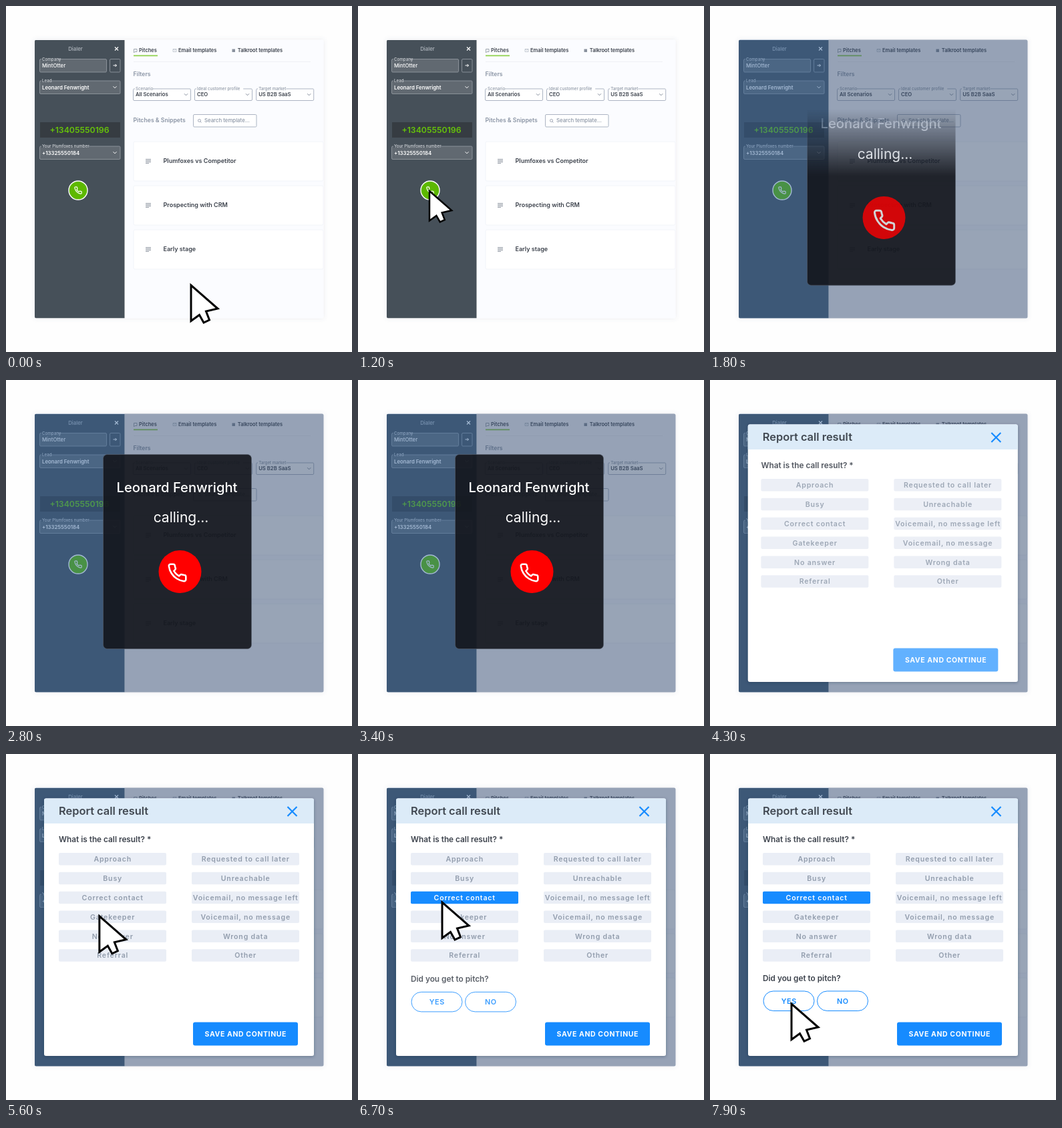
An HTML page for the animation above (8 s loop, 518x518 px).

```html
<!DOCTYPE html>
<html lang="en">
<head>
<meta charset="utf-8">
<title>Dialer</title>
<style>
  html, body { margin: 0; width: 100%; height: 100%; overflow: hidden; background: #fefefe; }
  svg { display: block; width: 100vw; height: 100vh; }
  text { font-family: Inter, "Liberation Sans", sans-serif; font-weight: 600; }
</style>
</head>
<body>
<svg id="stage" viewBox="0 0 518 518" xmlns="http://www.w3.org/2000/svg"></svg>
<script>
const LOOP = 8000;
const INK = '#3c424c', GREY = '#8b95a5', BLUE = '#168bff';

const rect = (x, y, w, h, fill, more = '') =>
  `<rect x="${x}" y="${y}" width="${w}" height="${h}" fill="${fill}" ${more}/>`;
const text = (x, y, size, fill, str, more = '') =>
  `<text x="${x}" y="${y}" font-size="${size}" fill="${fill}" ${more}>${str}</text>`;
const line = (d, stroke, width = 1, more = '') =>
  `<path d="${d}" fill="none" stroke="${stroke}" stroke-width="${width}" ${more}/>`;
const chevron = (x, y, stroke) => line(`M${x - 2.5} ${y - 1.2}l2.5 2.5l2.5 -2.5`, stroke, 1);
const centred = 'text-anchor="middle"';

// 24-unit handset, centred on x, y
const phone = (x, y, scale, width) => line(
  'M22 16.9v3a2 2 0 0 1-2.2 2a19.8 19.8 0 0 1-8.6-3.1a19.5 19.5 0 0 1-6-6a19.8 19.8 0 0 1-3.1-8.7' +
  'a2 2 0 0 1 2-2.1h3a2 2 0 0 1 2 1.7a13 13 0 0 0 .7 2.8a2 2 0 0 1-.5 2.1l-1.3 1.3a16 16 0 0 0 6 6' +
  'l1.3-1.3a2 2 0 0 1 2.1-.5a13 13 0 0 0 2.8.7a2 2 0 0 1 1.8 2.1z',
  '#fff', width, `stroke-linejoin="round" transform="translate(${x} ${y}) scale(${scale}) translate(-12 -12)"`);

const darkField = (y, w, label, value, weight) =>
  rect(50.5, y, w, 19.5, '#616971', 'rx="1.5" stroke="#989fa6" stroke-width=".8"') +
  rect(53, y - 1, label.length * 3.25 + 2, 3, '#4d565f') +
  text(54, y + 2.2, 6.2, '#d5d8dc', label, 'style="font-weight:500"') +
  text(54, y + 12.5, 7.8, '#fff', value, `style="font-weight:${weight}"`);

const select = (x, label, value) =>
  rect(x, 124, 86, 17.5, '#fff', 'rx="1.5" stroke="#98a2b4" stroke-width=".8"') +
  rect(x + 2.5, 122, label.length * 3.1 + 2, 4, '#fff') +
  text(x + 3.5, 126, 6.2, GREY, label, 'style="font-weight:500"') +
  text(x + 3.5, 135.3, 7.7, INK, value) + chevron(x + 79, 132.5, '#7f8998');

const card = (y, title) =>
  rect(191, y, 284, 59, '#fff', 'rx="2" stroke="#eff2f8" stroke-width=".8"') +
  line(`M209 ${y + 26.5}h8m-8 2h8m-8 2h8m-8 2h5`, '#858d99', .9) +
  text(235.5, y + 32, 9, INK, title);

const sidebar =
  rect(43, 51, 134.5, 416.5, '#465059') +
  text(104, 67, 7.8, '#b3b9c0', 'Dialer', centred + ' style="font-weight:500"') +
  line('M163 61.5l5 5m0 -5l-5 5', '#fff', 1.2) +
  darkField(79.5, 100, 'Company', 'MintOtter', 500) +
  rect(155.5, 79.5, 15.5, 19.5, '#465059', 'rx="1.5" stroke="#989fa6" stroke-width=".8"') +
  line('M160.5 89h5m-2 -2l2 2l-2 2', '#fff') +
  darkField(112, 120.5, 'Lead', 'Leonard Fenwright', 600) + chevron(163, 121.5, '#fff') +
  rect(51, 174, 120, 23, '#363c42') +
  text(110, 189.7, 12.3, '#66c30a', '+13405550196', centred) +
  darkField(210, 120.5, 'Your Plumfoxes number', '+13325550184', 600) + chevron(163, 219.5, '#fff') +
  '<circle cx="108" cy="276" r="14" fill="#5db800" stroke="#fff" stroke-width="1.4"/>' +
  phone(108, 276, .52, 2.3);

const content =
  rect(177.5, 51, 298, 416.5, '#fbfcff') +
  line('M191.5 64.5h4.5v4h-3l-1.5 1.5z', '#8a929e', .8) + text(199, 69.2, 7.5, INK, 'Pitches') +
  line('M250 64.5h5v4h-5zl2.5 2l2.5 -2', '#b1b8c2', .7) + text(258, 69.2, 7.5, INK, 'Email templates') +
  rect(338.5, 64.5, 4.5, 4.5, '#8a929e') + text(346.8, 69.2, 7.5, INK, 'Talkroot templates') +
  line('M191 83.5H456', '#eceef2', .8) + line('M191 74.3h36', '#8fd14c', 1.8) +
  text(190.5, 105, 8.7, GREY, 'Filters') +
  select(190.5, 'Scenario', 'All Scenarios') +
  select(282.5, 'Ideal customer profile', 'CEO') +
  select(374.7, 'Target market', 'US B2B SaaS') +
  text(190.5, 174, 8.7, GREY, 'Pitches &amp; Snippets') +
  rect(280.5, 162.5, 94.5, 18.5, '#fff', 'rx="1.5" stroke="#98a2b4" stroke-width=".8"') +
  '<circle cx="289.5" cy="171.5" r="2" fill="none" stroke="#8b95a5" stroke-width=".8"/>' +
  line('M291 173l1.6 1.6', GREY, .8) +
  text(297, 174.3, 7.8, GREY, 'Search template...', 'style="font-weight:500"') +
  card(203, 'Plumfoxes vs Competitor') + card(269, 'Prospecting with CRM') + card(335, 'Early stage');

const popup =
  rect(145.5, 111.5, 222, 291, '#14171d', 'rx="6" fill-opacity=".91" stroke="#59616d" stroke-width=".6"') +
  text(256, 167.5, 20.2, '#fff', 'Leonard Fenwright', centred + ' style="font-weight:500"') +
  text(262, 213, 21, '#fff', 'calling...', centred + ' style="font-weight:400"') +
  `<g id="hangup"><circle cx="260.5" cy="287" r="32" fill="#f00"/><g id="handset">${phone(0, 0, 1.28, 2)}</g></g>`;

const LEFT = ['Approach', 'Busy', 'Correct contact', 'Gatekeeper', 'No answer', 'Referral'];
const RIGHT = ['Requested to call later', 'Unreachable', 'Voicemail, no message left',
  'Voicemail, no message', 'Wrong data', 'Other'];
const option = (x, row, str, fill, ink) => {
  const y = 148 + row * 28.85;
  return rect(x, y, 161, 18.5, fill, 'rx="2"') +
    text(x + 80.7, y + 13.2, 10.6, ink, str, centred + ' letter-spacing=".8"');
};
const column = (x, list) => list.map((s, i) => option(x, i, s, '#eaeef6', '#929dad')).join('');
const pill = (x, str) =>
  rect(x, 355, 76, 29.5, '#fff', `rx="14.75" stroke="${BLUE}" stroke-width="1"`) +
  text(x + 38.3, 373.6, 10.8, BLUE, str, centred + ' letter-spacing=".6"');

const modal =
  rect(57, 66.5, 404, 385.5, '#fff', 'rx="3" filter="url(#shadow)"') +
  line('M57 104V69.5a3 3 0 0 1 3 -3H458a3 3 0 0 1 3 3V104z', 'none', 0, 'style="fill:#dcebf8"') +
  text(79, 91, 16.4, '#414851', 'Report call result') +
  line('M421.5 79l14 14m0 -14l-14 14', BLUE, 2.2) +
  '<g id="form">' + text(79, 131.5, 11.8, INK, 'What is the call result? *') +
  column(79, LEFT) + column(278, RIGHT) +
  `<g id="picked">${option(79, 2, LEFT[2], BLUE, '#fff')}</g></g>` +
  '<g id="save">' + rect(280, 401.5, 157, 35, BLUE, 'rx="3"') +
  text(358.8, 422.8, 10.5, '#fff', 'SAVE AND CONTINUE', centred + ' letter-spacing=".6" style="font-weight:700"') + '</g>' +
  '<g id="pitch">' + text(79, 339.5, 11.8, INK, 'Did you get to pitch?') + pill(80, 'YES') + pill(160.5, 'NO') + '</g>';

const wipe = (id, axis) =>
  `<linearGradient id="${id}Fade" gradientUnits="userSpaceOnUse" ${axis}>` +
  '<stop offset="0" stop-color="#fff"/><stop offset="1" stop-color="#fff" stop-opacity="0"/></linearGradient>' +
  `<mask id="${id}Mask" maskUnits="userSpaceOnUse" x="0" y="0" width="518" height="518">` +
  rect(0, 0, 518, 518, `url(#${id}Fade)`) + '</mask>';

const stage = document.getElementById('stage');
stage.innerHTML =
  '<defs><filter id="shadow" x="-10%" y="-10%" width="120%" height="120%">' +
  '<feDropShadow dx="0" dy="1" stdDeviation="2" flood-color="#1c2c44" flood-opacity=".35"/></filter>' +
  '<filter id="soft" x="-10%" y="-10%" width="120%" height="120%">' +
  '<feDropShadow dx="0" dy="0" stdDeviation="3" flood-color="#5a6b86" flood-opacity=".14"/></filter>' +
  '<clipPath id="round"><rect x="43" y="50.5" width="432.5" height="417" rx="2.5"/></clipPath>' +
  wipe('popup', 'x1="0" x2="0"') + wipe('modal', 'y1="0" y2="0"') + '</defs>' +
  rect(43, 50.5, 432.5, 417, '#fbfcff', 'rx="2.5" filter="url(#soft)"') +
  `<g clip-path="url(#round)">${content}${sidebar}<g id="dim">` +
  rect(177.5, 50, 299, 418, '#324b6e', 'fill-opacity=".5"') +
  rect(43, 50, 134.5, 418, '#31639c', 'fill-opacity=".45"') + '</g></g>' +
  `<g id="popup" mask="url(#popupMask)">${popup}</g>` +
  `<g id="modal" mask="url(#modalMask)">${modal}</g>` +
  '<path id="cursor" d="M0 0V53.5L12.5 44.5L19 56L27.5 52L22.5 39L40 35Z" fill="#fff" stroke="#000" stroke-width="3"/>';

const $ = id => document.getElementById(id);
const clamp = v => Math.min(1, Math.max(0, v));
const span = (t, from, to) => clamp((t - from) / (to - from));
const mix = (a, b, p) => a + (b - a) * p;
const inOut = p => p < .5 ? 2 * p * p : 1 - 2 * (1 - p) ** 2;
const cubicLeft = p => (1 - p) ** 3;
const quadLeft = p => (1 - p) ** 2;

const set = (id, x, y, opacity, scale = 1) => {
  const el = $(id);
  el.setAttribute('transform', `translate(${x} ${y}) scale(${scale})`);
  el.setAttribute('opacity', opacity);
  el.style.display = opacity > 0 ? '' : 'none';
};
const fade = (id, axis, from, to) => {
  $(id).setAttribute(axis + 1, from);
  $(id).setAttribute(axis + 2, to);
};

// start, end, from x/y, to x/y
const MOVES = [
  [200, 1050, 277, 418, 107, 277],
  [5000, 5800, 238, 390, 126, 222],
  [6850, 7650, 126, 222, 122, 374]
];
const press = (t, at) => span(t, at - 100, at - 20) - span(t, at + 60, at + 150);

function drawCursor(t) {
  const move = MOVES.filter((m, i) => i === 0 || t >= m[0]).pop();
  const p = inOut(span(t, move[0], move[1]));
  const shown = t < 4900 ? 1 - span(t, 1450, 1550) : span(t, 5000, 5120);
  const scale = 1 - .17 * (press(t, 1200) + press(t, 6000));
  set('cursor', mix(move[2], move[4], p), mix(move[3], move[5], p), shown, scale);
}

function draw(t) {
  $('dim').setAttribute('opacity', span(t, 1520, 1720));

  const p = span(t, 1620, 2030), late = span(t, 1675, 2085);
  const gone = span(t, 3500, 3680);
  const rise = 90 * cubicLeft(p);
  set('popup', 0, rise, t < 1620 ? 0 : 1 - gone);
  const edge = mix(420, 10, p);
  fade('popupFade', 'y', edge, edge - 100);
  set('hangup', 0, 90 * cubicLeft(late) - rise, clamp(late * 2.6));
  const settle = span(t, 1800, 2150);
  set('handset', mix(261, 256.5, settle), mix(291, 288.5, settle), 1, mix(1.15, 1, settle));

  set('modal', -40 * quadLeft(span(t, 3650, 4350)), 0, t < 3650 ? 0 : 1);
  const front = 57 + (t - 3650) * 1.29;
  fade('modalFade', 'x', front - 120, front);
  set('form', -22 * quadLeft(span(t, 3900, 4500)), 0, span(t, 3900, 4350));
  set('save', -22 * quadLeft(span(t, 4000, 4600)), 0, span(t, 4000, 4450));
  set('picked', 0, 0, t < 6000 ? 0 : 1);
  set('pitch', 0, 10 * quadLeft(span(t, 6450, 6850)), span(t, 6450, 6750));

  drawCursor(t);
}

const start = performance.now();
function tick() {
  draw((performance.now() - start) % LOOP);
  requestAnimationFrame(tick);
}
tick();
</script>
</body>
</html>
```
